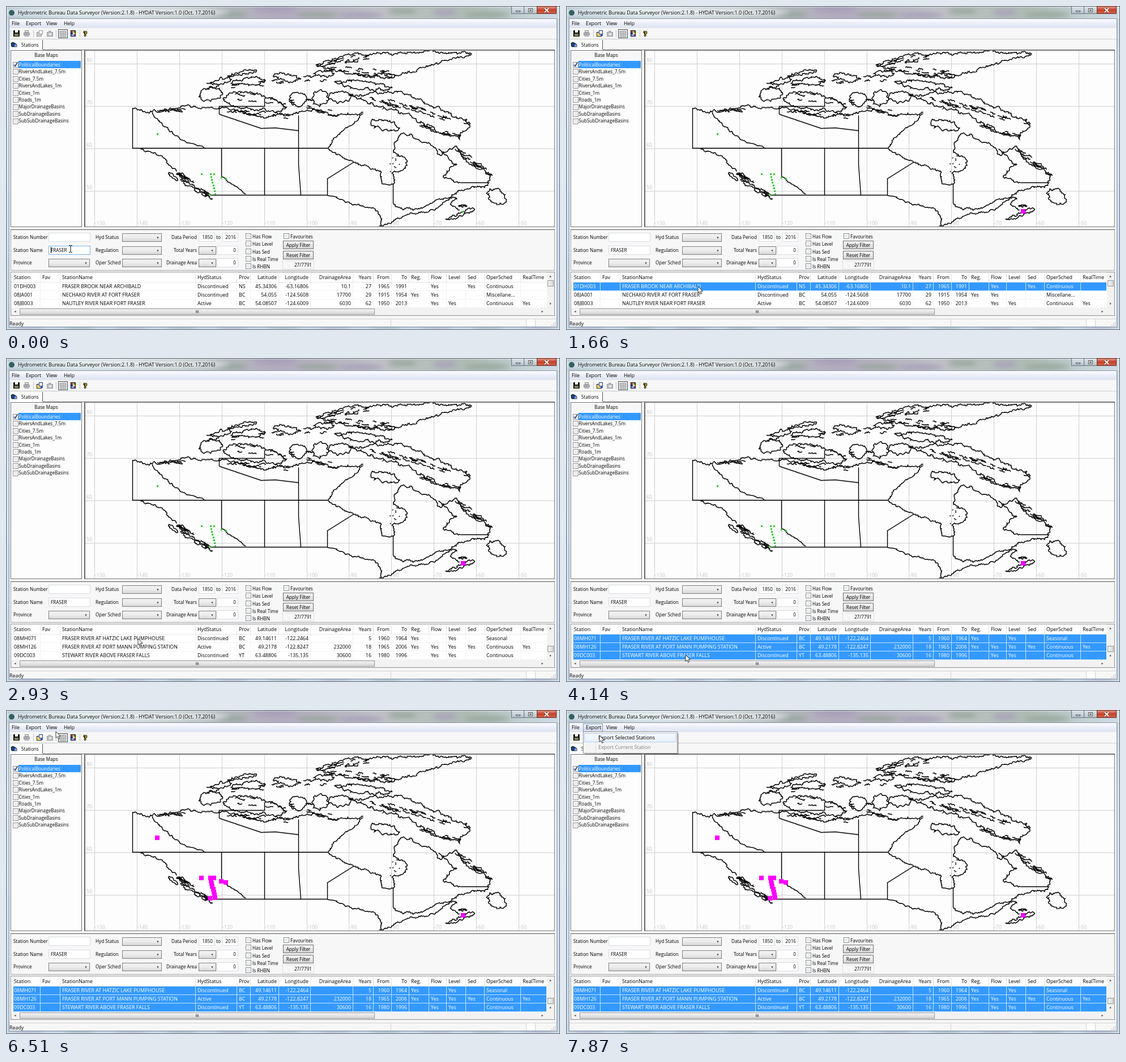
These frames come from a looping animation (978 by 573 pixels, 8 s). An HTML page with a canvas:

```html
<!DOCTYPE html>
<html lang="en">
<head>
<meta charset="utf-8">
<title>Station explorer</title>
<style>
html, body { margin: 0; width: 100%; height: 100%; overflow: hidden; background: #c3d6e6; }
canvas { display: block; }
</style>
</head>
<body>
<canvas id="stage" width="978" height="573"></canvas>
<script>
const W = 978, H = 573, LOOP = 8000;
const BLUE = '#3399ff', FACE = '#f7f7f7', GREEN = '#33cc33', PINK = '#ff00ff';
const UI = '8.9px "Open Sans", sans-serif', SMALL = '8.2px "Open Sans", sans-serif';
let ctx = document.getElementById('stage').getContext('2d');

// ---- drawing helpers
function box(x, y, w, h, fill, border) {
  if (fill) { ctx.fillStyle = fill; ctx.fillRect(x, y, w, h); }
  if (border) { ctx.strokeStyle = border; ctx.lineWidth = 1; ctx.strokeRect(x + .5, y + .5, w - 1, h - 1); }
}
function text(str, x, y, font = SMALL, color = '#000', align = 'left') {
  ctx.font = font; ctx.fillStyle = color; ctx.textAlign = align;
  ctx.fillText(str, x, y);
}
function shade(x0, y0, x1, y1, ...colors) {
  const g = ctx.createLinearGradient(x0, y0, x1, y1);
  colors.forEach((c, i) => g.addColorStop(i / (colors.length - 1), c));
  return g;
}
const vertical = (y, h, ...colors) => shade(0, y, 0, y + h, ...colors);
function shape(points, fill, stroke, width = 1) {
  ctx.beginPath();
  points.forEach(([x, y]) => ctx.lineTo(x, y));
  if (fill) { ctx.closePath(); ctx.fillStyle = fill; ctx.fill(); }
  if (stroke) { ctx.strokeStyle = stroke; ctx.lineWidth = width; ctx.stroke(); }
}
function blot(x, y, rx, ry, color) {
  ctx.fillStyle = color;
  ctx.beginPath(); ctx.ellipse(x, y, rx, ry, 0, 0, 7); ctx.fill();
}
const parse = str => str.split(' ').map(p => p.split(',').map(Number));
const triangle = (x, y, dx, dy) =>
  shape([[x - dy - dx, y - dx - dy], [x + dx, y + dy], [x + dy - dx, y + dx - dy]], '#333');

let seed = 11;
const rnd = (lo = 0, hi = 1) => lo + (hi - lo) * (seed = (seed * 16807) % 2147483647) / 2147483647;

// ---- map: key points joined by fractal coastlines
function coast(points, rough = 5, width = 1.5) {
  if (typeof points === 'string') points = parse(points);
  const out = [points[0]];
  const split = (a, b) => {
    const dx = b[0] - a[0], dy = b[1] - a[1], len = Math.hypot(dx, dy);
    if (len < 2.6) { out.push(b); return; }
    const k = rnd(-.5, .5) * Math.min(.8, rough / len);
    const mid = [(a[0] + b[0]) / 2 - dy * k, (a[1] + b[1]) / 2 + dx * k];
    split(a, mid); split(mid, b);
  };
  for (let i = 1; i < points.length; i++) split(points[i - 1], points[i]);
  shape(out, null, '#000', width);
}
const border = str => shape(parse(str), null, '#000', 1.4);
function island(x, y, rx, ry, tilt = 0) {
  const ring = [];
  for (let i = 0; i < 8; i++) {
    const a = i * Math.PI / 4, px = Math.cos(a) * rx * rnd(.85, 1.1);
    ring.push([x + px, y + Math.sin(a) * ry * rnd(.75, 1.15) + px * tilt]);
  }
  coast([...ring, ring[0]]);
}
// short fjords and inlets strewn over a slanted strip
function fjords(x0, y0, x1, y1, spread, count, tilt = .1) {
  for (let i = 0; i < count; i++) {
    const u = rnd(), x = x0 + (x1 - x0) * u, y = y0 + (y1 - y0) * u + rnd(-spread, spread), w = rnd(3, 9);
    coast([[x - w, y - w * tilt], [x, y + rnd(-2, 2)], [x + w, y + w * tilt]], 4);
  }
}

function drawMap() {
  box(139, 78, 830, 313, '#fdfdfd');
  for (let i = 0; i < 11; i++) {
    const x = Math.round(156 + i * 74.9);
    box(x, 79, 1, 311, '#cfcfcf');
    text(i * 10 - 150, x + 1, 387, UI, '#c4c4c4');
  }
  for (let i = 0; i < 4; i++) {
    box(139, 102 + i * 75, 829, 1, '#cfcfcf');
    text(80 - i * 10, 142, 99 + i * 75, UI, '#c4c4c4');
  }
  ctx.translate(.5, .5);
  // territorial and provincial borders
  border('223,180 223,251 568,251');
  border('376,191 376,177 456,177 456,163');
  border('376,191 450,216 475,215 516,220');
  border('516,193 516,280 520,334');
  border('380,251 380,300');
  border('456,251 456,334');
  border('360,334 567,334 567,305 613,276');
  border('683,315 683,349');
  border('802,312 853,312');
  coast('380,300 422,333', 2);
  coast('258,187 275,208 290,222 318,241 352,251', 3);
  coast('763,253 795,280 772,303 802,312');
  // mainland
  coast('223,180 258,186 325,177 392,181 445,195 516,188 548,183 576,194 630,188');
  coast('630,190 608,211 578,233 568,251 613,276 660,291 663,312 683,315', 4);
  coast('683,315 681,295 705,286 704,268 684,254 695,227 714,226 731,239 747,242 766,264 791,248');
  coast('791,248 812,275 856,298 850,317 802,326 770,348 745,364');
  coast('745,364 712,367 660,388 663,376 650,358 602,346 567,334', 3);
  coast('683,349 700,360 740,354 760,342 795,341 784,350 800,361', 4);
  coast('237,252 258,259 281,271 301,292', 4);
  fjords(305, 297, 357, 333, 4, 16, .7);
  fjords(264, 184, 330, 182, 3, 8);
  fjords(392, 185, 500, 195, 4, 14);
  fjords(798, 256, 854, 298, 4, 14, .4);
  // islands of the two coasts
  island(332, 322, 25, 4, .65);
  island(294, 301, 9, 4, .7);
  island(803, 367, 26, 4, -.35);
  island(806, 353, 8, 2);
  island(866, 336, 18, 13, .3);
  // the northern archipelago
  coast('548,105 610,86 740,79 822,84 750,103 682,127 600,119 548,105');
  coast('604,156 690,152 750,176 819,208 800,235 757,219 706,190 652,177 604,156', 8);
  island(361, 157, 23, 12, -.15);
  island(381, 132, 19, 6, -.2);
  island(415, 119, 26, 4, -.2);
  island(428, 133, 32, 7, -.1);
  island(440, 171, 62, 14, .15);
  island(496, 126, 24, 7, .1);
  island(515, 164, 17, 13);
  island(553, 163, 16, 14);
  island(590, 160, 20, 9);
  island(562, 119, 18, 6);
  island(632, 139, 48, 7, .1);
  island(668, 211, 26, 10, .15);
  fjords(550, 104, 640, 88, 5, 14, -.2);
  fjords(560, 112, 690, 120, 6, 24);
  fjords(350, 140, 560, 124, 9, 14, -.1);
  fjords(410, 160, 580, 182, 12, 18);
  fjords(640, 160, 815, 208, 5, 26, .4);
  fjords(715, 205, 800, 232, 5, 10, .3);
  for (let i = 0; i < 14; i++) box(rnd(674, 698), rnd(255, 292), 2, 2, '#333');
  ctx.translate(-.5, -.5);
}
function cached(draw) {
  const layer = document.createElement('canvas');
  layer.width = W; layer.height = H;
  const saved = ctx;
  ctx = layer.getContext('2d');
  draw();
  ctx = saved;
  return layer;
}

// the stations follow the river south, with a few tributaries
const stations = parse('267,226 345,297 367,297 380,303 388,305 360,333');
for (let u = 0; u <= 1; u += 1 / 7) stations.push([Math.round(361 + 8 * u), Math.round(297 + 35 * u)]);
function station(x, y, selected) {
  selected ? box(x - 4, y - 4, 8, 8, PINK) : box(x - 1, y - 1, 3, 3, GREEN);
}

// ---- static window parts
function drawGlass() {
  box(0, 0, W, H, vertical(0, H, '#c3d2dc', '#cfe0ee', '#c3daf0', '#bccfdf'));
  box(0, 0, W, 23, shade(0, 0, W, 0, '#b4c5cf', '#c8d6dd', '#b4bfbe', '#b3abc0', '#bfc2c6', '#aebcb3', '#cfdde8'));
  ctx.filter = 'blur(4px)';
  for (let x = 400; x < 880; x += 75) blot(x, rnd(4, 16), rnd(20, 45), 5, x % 2 ? '#a79fb8' : '#98a69d');
  for (let x = 40; x < W; x += 90) blot(x, 572, 28, 2, x % 4 ? '#7d9a9b' : '#9a8fb6');
  blot(190, 11, 205, 8, 'rgba(255,255,255,.65)');
  ctx.filter = 'none';
  box(0, 0, W, H, null, '#4d5a66');
  box(1, 1, W - 2, H - 2, null, 'rgba(255,255,255,.6)');
  blot(10, 12, 5, 5, '#2e6268');
  text('Hydrometric Bureau Data Surveyor (Version:2.1.8) - HYDAT Version:1.0 (Oct. 17,2016)', 21, 15, UI);
  for (const [x, w] of [[892, 23], [914, 24]]) box(x, 0, w, 14, vertical(0, 14, '#dfe7ec', '#b4c1ca'), '#66717d');
  box(937, 0, 35, 14, vertical(0, 14, '#e5a494', '#c4412b', '#d0694e'), '#6b2a22');
  box(900, 8, 8, 3, '#fff', '#555');
  box(922, 4, 8, 7, '#fff', '#555'); box(924, 6, 4, 3, '#777');
  for (const [w, c] of [[3.4, '#6a2a22'], [1.9, '#fff']]) {
    shape([[951, 4], [958, 11]], null, c, w); shape([[958, 4], [951, 11]], null, c, w);
  }
}
function combo(x, y, w) {
  box(x, y, w, 15, vertical(y, 15, '#f3f3f3', '#ececec', '#d4d4d4'), '#808080');
  triangle(x + w - 7, y + 8, 0, 1.6);
}
function field(x, y, w, value = '', fill = '#fff') {
  box(x, y, w, 16, fill, '#dadde2');
  text(value, x + w - 4, y + 10.5, SMALL, '#000', 'right');
}
function checkbox(x, y, label) {
  box(x, y, 10, 10, '#fff', '#8b8f94');
  box(x + 2, y + 2, 6, 6, '#e9ebed');
  if (label) text(label, x + 12, y + 8.5);
}
function button(y, label) {
  box(489, y, 54, 15, vertical(y, 15, '#f4f4f4', '#e9e9e9', '#d2d2d2'), '#707070');
  text(label, 516, y + 10.5, SMALL, '#000', 'center');
}
function drawForm() {
  box(8, 395, 961, 73, FACE, '#a0a0a0');
  box(8, 395, 961, 1, '#555');
  const labels = [
    ['Station Number', 'Hyd Status', 'Data Period'],
    ['Station Name', 'Regulation', 'Total Years'],
    ['Province', 'Oper Sched', 'Drainage Area']];
  labels.forEach((row, i) => {
    const y = Math.round(402 + i * 22.5);
    text(row[0], 13, y + 10); text(row[1], 158, y + 10);
    text(row[2], 337, y + 10, SMALL, '#000', 'right');
    combo(205, y, 70);
    if (i) { combo(340, y, 31); field(372, y - 1, 38, '0'); }
  });
  combo(75, 447, 73);
  field(75, 401, 74);
  field(340, 401, 29, '1850'); field(382, 401, 28, '2016');
  text('to', 371, 412);
  ['Has Flow', 'Has Level', 'Has Sed', 'Is Real Time', 'Is RHBN'].forEach((s, i) => checkbox(423, Math.round(402 + i * 13.3), s));
  checkbox(490, 402, 'Favourites');
  button(415, 'Apply Filter'); button(433, 'Reset Filter');
  field(488, 450, 56, '27/7791', FACE);
}
function drawFrame() {
  drawGlass();
  box(5, 22, 968, 546, FACE, '#8a98a6');
  drawMap();
  box(6, 23, 966, 16, vertical(23, 16, '#fdfdff', '#e9edf7', '#dde3f1'));
  box(6, 39, 966, 38, FACE);
  box(6, 58, 966, 1, '#c9c9c9');
  // tab
  box(6, 60, 59, 18, '#fff');
  box(64, 60, 1, 17, '#555'); box(65, 77, 904, 1, '#777');
  shape(parse('9,66 12,64 16,66 19,68 19,72 10,72'), '#1f3d7a', '#111');
  blot(17, 70, 2.4, 2.4, '#6f9bd8');
  text('Stations', 27, 72);
  // layer list
  box(8, 78, 126, 313, '#fdfdfd', '#777');
  box(9, 79, 124, 17, FACE);
  text('Base Maps', 71, 89.5, SMALL, '#000', 'center');
  box(22, 97, 110, 13, BLUE);
  ['PoliticalBoundaries', 'RiversAndLakes_7.5m', 'Cities_7.5m', 'RiversAndLakes_1m', 'Cities_1m', 'Roads_1m',
    'MajorDrainageBasins', 'SubDrainageBasins', 'SubSubDrainageBasins'].forEach((s, i) => {
    checkbox(12, Math.round(99 + i * 12.45));
    text(s, 22.5, 106.7 + i * 12.45, SMALL, i ? '#000' : '#fff');
  });
  shape([[14, 104], [16, 106.5], [20, 100]], null, '#24357a', 1.5);
  box(138, 78, 831, 313, null, '#777');
  box(138, 78, 2, 313, '#666');
  drawForm();
  // status bar
  box(6, 553, 966, 1, '#d0d0d0');
  for (const x of [679, 918, 934]) box(x, 554, 1, 13, '#d5d5d5');
  box(919, 554, 14, 13, '#fff');
  for (let i = 0; i < 3; i++) for (let j = 0; j <= i; j++) box(969 - j * 3, 558 + i * 3, 1.5, 1.5, '#aaa');
}

// ---- toolbar
function drawToolbar(active) {
  for (const x of [8, 48, 88, 130]) box(x, 42, 1, 13, '#c4c4c4');
  box(13, 43, 11, 11, '#111'); box(16, 43, 5, 4, '#fff'); box(15, 49, 7, 4, '#7a8a52');
  box(31, 47, 11, 5, '#b0b0b0', '#999'); box(33, 43, 7, 4, '#ddd', '#999'); box(33, 51, 7, 3, '#e8e8e8', '#999');
  box(54, 46, 9, 8, active ? '#f5df62' : '#ccc', active ? '#222' : '#999');
  box(58, 43, 7, 7, '#f5f5f5', active ? '#223a9a' : '#999');
  if (active) box(61, 49, 4, 4, '#3159c8');
  box(72, 46, 11, 8, '#c0c0c0', '#999'); box(75, 44, 5, 3, '#b0b0b0'); blot(78, 50, 2, 2, '#eee');
  box(92, 41, 17, 16, '#e2e5ea', '#555');
  for (let i = 0; i < 4; i++) { box(95 + i * 3.3, 44, 1, 11, '#999'); box(95, 44 + i * 3.3, 11, 1, '#999'); }
  box(114, 43, 9, 11, '#fff', '#111');
  ['#d23', '#2a2', '#22c', '#dd2', '#2bc', '#b2b'].forEach((c, i) => box(115 + i % 2 * 4, 44 + (i >> 1) * 3, 3, 3, c));
  const help = 'bold 12px "Liberation Serif", serif';
  ctx.strokeStyle = '#111'; ctx.lineWidth = 2.2; ctx.font = help; ctx.textAlign = 'center';
  ctx.strokeText('?', 140, 53);
  text('?', 140, 53, help, '#f5d800', 'center');
}

// ---- station table
let edge = 12;
const columns = Object.entries({
  Station: 48, Fav: 35, StationName: 239, HydStatus: 73, Prov: 24, Latitude: 50, Longitude: 56, DrainageArea: 75, Years: 36,
  From: 32, To: 31, 'Reg.': 35, Flow: 31, Level: 34, Sed: 33, OperSched: 64, RealTime: 46,
}).map(([name, width], i) => {
  const left = edge, right = i > 4 && i < 11;
  edge += width;
  return { name, left, x: right ? edge - 3 : left + (i ? 4 : 2), align: right ? 'right' : 'left' };
});
// Y stands for "Yes"
const rows = {
  0: '01DH003||FRASER BROOK NEAR ARCHIBALD|Discontinued|NS|45.34306|-63.16806|10.1|27|1965|1991||Y||Y|Continuous|',
  1: '08JA001||NECHAKO RIVER AT FORT FRASER|Discontinued|BC|54.055|-124.5608|17700|29|1915|1954|Y|Y|||Miscellane...|',
  2: '08JB003||NAUTLEY RIVER NEAR FORT FRASER|Active|BC|54.08507|-124.6009|6030|62|1950|2013||Y|Y||Continuous|Y',
  9: '08KE001||FRASER RIVER AT PRINCE GEORGE|Discontinued|BC|53.9125|-122.7117|79500|22|1927|1968|Y|Y|Y||Seasonal|',
  10: '08KE002||FRASER RIVER AT QUESNEL|Discontinued|BC|52.97444|-122.4969|97900|51|1929|1994|Y|Y|Y||Continuous|',
  11: '08KE018||FRASER RIVER AT SOUTH FORT GEORGE|Active|BC|53.90078|-122.7349|79900|46|1968|2013|Y|Y|Y||Continuous|Y',
  24: '08MH071||FRASER RIVER AT HATZIC LAKE PUMPHOUSE|Discontinued|BC|49.14611|-122.2464||5|1960|1964|Y||Y||Seasonal|',
  25: '08MH126||FRASER RIVER AT PORT MANN PUMPING STATION|Active|BC|49.2178|-122.8247|232000|18|1965|2006|Y|Y|Y|Y|Continuous|Y',
  26: '09DC003||STEWART RIVER ABOVE FRASER FALLS|Discontinued|YT|63.48806|-135.135|30600|16|1980|1996||Y|Y||Continuous|',
};
const places = ['MCBRIDE', 'RED PASS', 'HANSARD', 'SHELLEY', 'MARGUERITE', 'TEXAS CREEK', 'HOPE', 'MISSION'];
for (let i = 3; i < 24; i++) {
  const years = Math.round(rnd(8, 62)), lat = (54.2 - i * .2).toFixed(5), lon = rnd(-122.9, -121.1).toFixed(4);
  rows[i] ??= `08M${'ABCDEF'[i >> 2]}0${i + 10}||FRASER RIVER AT ${places[i % 8]}|Active|BC|${lat}|${lon}|${i * 9700}|${years}|${2014 - years}|2013|Y|Y|Y||Continuous|Y`;
}
function drawTable(scroll, isSelected) {
  box(8, 470, 961, 78, '#fff', '#8a8f98');
  box(9, 488, 945, 1, '#e2e4e8');
  for (const { name, left, x, align } of columns) {
    box(left, 472, 1, 16, '#e2e4e8');
    text(name, x, 482.7, UI, '#000', align);
  }
  for (let i = 0; i < 3; i++) {
    const y = Math.round(489.4 + i * 14.7), chosen = isSelected(scroll + i);
    const rule = chosen ? '#c8e2ff' : '#f3f3f3';
    if (chosen) box(13, y, 941, 14, BLUE);
    box(12, y + 14, 942, 1, rule);
    rows[scroll + i].split('|').forEach((value, k) => {
      const { left, x, align } = columns[k];
      if (k) box(left, y, 1, 14, rule);
      text(value === 'Y' ? 'Yes' : value, x, y + 10.3, UI, chosen ? '#fff' : '#000', align);
    });
  }
  // scroll bars
  box(955, 471, 13, 63, '#f2f2f2');
  triangle(961, 478, 0, -1.5); triangle(961, 527, 0, 1.5);
  box(956, 485 + scroll, 11, 11, shade(956, 0, 967, 0, '#f5f5f5', '#d5d5d5'), '#979797');
  box(9, 534, 959, 13, '#f2f2f2');
  triangle(16, 540.5, -1.5, 0); triangle(947, 540.5, 1.5, 0);
  box(24, 535, 627, 11, vertical(535, 11, '#f7f7f7', '#e4e4e4', '#cfcfcf'), '#979797');
  for (let i = 0; i < 3; i++) box(335 + i * 2, 538, 1, 5, '#555');
}

// ---- menus and pointer
function drawMenuBar(highlight) {
  if (highlight) box(30, 24, 35, 15, vertical(24, 15, '#eef2fa', '#ccd5e8'), '#8f9db8');
  [['File', 10], ['Export', 35], ['View', 71], ['Help', 102]].forEach(([s, x]) => text(s, x, 34.3, UI));
}
function drawMenu(hover) {
  box(33, 41, 166, 38, 'rgba(0,0,0,.25)');
  box(30, 38, 167, 39, '#f4f4f4', '#979797');
  box(52, 40, 1, 35, '#dcdcdc');
  if (hover) box(32, 41, 163, 16, vertical(41, 16, '#f5f8fc', '#e8f1fa'), '#aecff7');
  text('Export Selected Stations', 57, 52.3, UI);
  text('Export Current Station', 57, 69.3, UI, '#808080');
}
function drawArrow(x, y) {
  const outline = parse('0,0 0,11.5 2.7,9 4.7,13.4 6.6,12.6 4.7,8.3 8.3,8.3 0,0');
  shape(outline.map(([a, b]) => [x + a, y + b]), '#fff', '#222', .9);
}
function drawBeam(x, y) {
  box(x - .5, y - 5, 1, 11, '#000');
  for (const dy of [-6, 6]) { box(x - 3, y + dy, 2.5, 1, '#000'); box(x + .5, y + dy, 2.5, 1, '#000'); }
}

const START = [114, 429], TICK = 137;
const legs = [
  { from: 430, until: 980, to: [262, 506] },
  { from: 1110, until: 1390, to: [233, 496] },
  { from: 3480, until: 3870, to: [211, 525] },
  { from: 5530, until: 6510, to: [88, 38] },
  { from: 6630, until: 7110, to: [47, 32] },
  { from: 7730, until: 7870, to: [59, 45] }];
// the pointer is sampled once per tick, so it moves in small jumps
function pointer(t) {
  let pos = START;
  for (const { from, until, to } of legs) {
    if (t < from) break;
    const count = Math.round((until - from) / TICK) + 1;
    const u = Math.min(1, (1 + Math.floor((t - from) / (until - from) * (count - 1) + 1e-6)) / count);
    const k = u * u * (3 - 2 * u);
    pos = pos.map((v, i) => v + (to[i] - v) * k);
  }
  return pos;
}
// wheel notches: time and number of three-row turns
const wheel = [[1930, 1], [2070, 1], [2200, 1], [2470, 2], [2620, 1], [2930, 2]];
const scrolled = t => wheel.reduce((sum, [time, turns]) => sum + (t >= time ? turns * 3 : 0), 0);

const base = cached(drawFrame);
function render(t) {
  ctx.drawImage(base, 0, 0);
  stations.forEach(([x, y]) => station(x, y, t >= 4290));
  station(807, 363, t >= 1660);
  drawToolbar(t >= 1660);
  box(75, 424, 74, 16, '#fff', t < 1540 ? '#7eb4ea' : '#dadde2');
  text('FRASER', 79, 434.7);
  if (t < 430) box(79, 426, 1, 11, '#000');
  drawTable(scrolled(t), i => t >= 4140 || (t >= 1540 && i === 0));
  const open = t >= 7280;
  if (!open) text('Ready', 6, 564.7, UI);
  drawMenuBar(t >= 7110);
  if (open) {
    box(29, 40, 943, 18, FACE);
    box(13, 43, 11, 11, '#111'); box(16, 43, 5, 4, '#fff'); box(15, 49, 7, 4, '#7a8a52');
    drawMenu(t >= 7870);
  }
  const [x, y] = pointer(t);
  if (x < 149 && y > 423 && y < 441) drawBeam(x, y); else drawArrow(x, y);
}
function tick(now) {
  render(now % LOOP);
  requestAnimationFrame(tick);
}
render(0);
requestAnimationFrame(tick);
</script>
</body>
</html>
```
